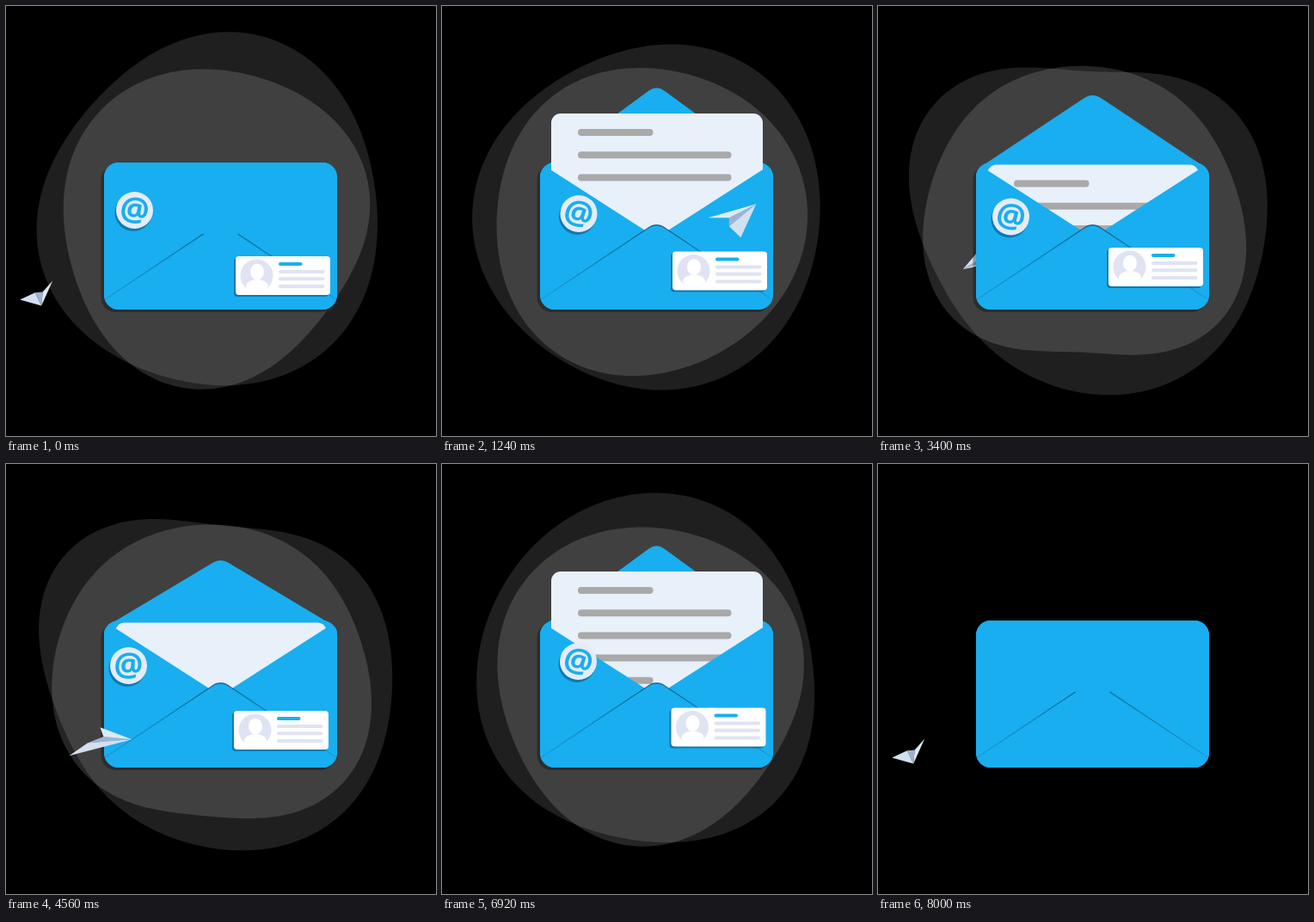
An HTML page with a canvas for the animation above (8040 ms loop, 500 by 500 pixels).

```html
<!DOCTYPE html>
<html>
<head>
<meta charset="utf-8">
<style>
html, body { margin: 0; height: 100%; overflow: hidden; background: #000; }
canvas { display: block; }
</style>
</head>
<body>
<canvas id="stage" width="500" height="500"></canvas>
<script>
const ctx = document.getElementById('stage').getContext('2d');
const LOOP = 8040, STEP = 40, CYCLE = 4000, TAU = 2 * Math.PI;
const BLUE = '#19aeef', PAPER = '#e8f0fa', PALE = '#dfe3f3';
const { sin, cos } = Math;

// time, badge x, y, card x, y
const drift = [
  [0, 149.5, 237.5, 267, 291],
  [1240, 159, 241.5, 268, 285.5],
  [3400, 154.5, 245, 268, 281],
  [4560, 142.5, 234.5, 265, 287],
  [5480, 144, 237.5, 271, 283.5],
  [6920, 158.5, 229.5, 266.5, 283.5]
];
// time, right and left wing tips seen from the nose
const pose = [
  [0, -25, -7, 13, -29],
  [560, -73, 19, -37, -14],
  [1240, -18, 39, -56, 16],
  [1480, 0, 24, -46, 20],
  [3400, 29, -34, 56, -12]
];

const clamp = v => Math.max(0, Math.min(1, v));
const ease = v => (v = clamp(v), v * v * (3 - 2 * v));

// Periodic cubic interpolation through the rows
function sample(rows, time, period) {
  const t = time % period, n = rows.length;
  const row = i => rows[(i + n) % n];
  const at = i => row(i)[0] + Math.floor(i / n) * period;
  let i = n - 1;
  while (at(i) > t) i--;
  const h = at(i + 1) - at(i), u = (t - at(i)) / h;
  return row(i).slice(1).map((_, k) => {
    const v = j => row(j)[k + 1];
    const slope = j => (v(j + 1) - v(j - 1)) / (at(j + 1) - at(j - 1)) * h;
    const a = v(i), d = v(i + 1) - a, m = slope(i), w = slope(i + 1);
    return a + u * (m + u * (3 * d - 2 * m - w + u * (m + w - 2 * d)));
  });
}

function fill(color, draw) {
  ctx.beginPath();
  draw(ctx);
  ctx.fillStyle = color;
  ctx.fill();
}
const box = (color, x, y, w, h, r) => fill(color, c => c.roundRect(x, y, w, h, r));
const oval = (color, x, y, rx, ry = rx) => fill(color, c => c.ellipse(x, y, rx, ry, 0, 0, 7));
const poly = (color, ...pts) => fill(color, c => {
  pts.forEach(p => c.lineTo(...p));
  c.closePath();
});

function clipToBody() {
  ctx.beginPath();
  ctx.roundRect(114, 182, 271, 171, 17);
  ctx.clip();
}

// Radii as sums of harmonics that swing with two slow waves w and v
const outer = (a, w, v) => 201
  + (4 + 4 * w) * cos(a) + (1 + 5 * w) * sin(a)
  + (2.5 + 6.5 * w) * cos(2 * a) + (4.5 + 8.5 * v) * sin(2 * a)
  + (3.5 * v - 3) * cos(3 * a) - (3 + 9 * w) * sin(3 * a)
  - (2.7 + 3.2 * v) * cos(4 * a);
const inner = (a, w, v) => 180.5
  + (4.3 - 3.5 * w) * sin(a)
  + (2.5 + 7 * w) * cos(2 * a) + (.5 + 3.5 * v) * sin(2 * a)
  + (1.5 - 3.5 * v) * cos(3 * a) + (1 + 8.5 * w) * sin(3 * a)
  - (1.5 + 3 * w) * cos(4 * a);

function blob(radius, time, alpha) {
  const w = cos(TAU * (time - 3500) / 8000), v = cos(TAU * (time - 4500) / 8000);
  fill(`rgba(255,255,255,${alpha})`, c => {
    for (let a = 0; a < TAU; a += TAU / 180) {
      const r = radius(a, w, v);
      c.lineTo(240 + r * cos(a), 245 + r * sin(a));
    }
  });
}

// The plane circles the envelope on a tilted orbit
function plane(t) {
  const phi = TAU * (t + 110) / CYCLE;
  const nose = [253 - 215 * cos(phi), 258 + 88 * cos(phi) + 21.5 * sin(phi)];
  const [rx, ry, lx, ly] = sample(pose, t, CYCLE);
  const point = (r, l) => [nose[0] + r * rx + l * lx, nose[1] + r * ry + l * ly];
  const fold = point(.2, .5), keel = point(.5, .4);
  poly('#9db4d0', nose, fold, keel);
  poly('#d3e0f1', nose, point(1, 0), keel);
  poly('#dcebf8', nose, point(0, 1), fold);
}

function flap(open) {
  ctx.save();
  if (open < 0) clipToBody();
  ctx.translate(0, 187);
  ctx.scale(1, open);
  fill(BLUE, c => {
    c.moveTo(114, 12);
    c.quadraticCurveTo(114, 4, 121, -1);
    c.lineTo(240.5, -88.5);
    c.quadraticCurveTo(249.5, -95, 258.5, -88.5);
    c.lineTo(378, -1);
    c.quadraticCurveTo(385, 4, 385, 12);
  });
  ctx.restore();
}

function letter(t) {
  const rise = ease((t - 640) / 240) - ease((t - 3120) / 240);
  const top = 184.5 - 59.5 * rise;
  box(PAPER, 127, top, 246, 340 - top, [11, 11, 0, 0]);
  for (let i = 0; i < 5; i++) {
    const full = i % 4 ? 178.5 : 87.5;
    const w = full * clamp((t - 880 - 120 * i) / 120);
    if (w > 0) box('#a9a9a9', 158, top + 18 + 26.2 * i, w, 8, 4);
  }
}

function pocket() {
  ctx.save();
  clipToBody();
  poly(BLUE, [114, 182.5], [249.5, 269.5], [385, 182.5], [385, 353], [114, 353]);
  const shade = ctx.createRadialGradient(249.5, 258, 0, 249.5, 258, 160);
  shade.addColorStop(0, 'rgba(10,70,105,.75)');
  shade.addColorStop(.35, 'rgba(10,70,105,.5)');
  shade.addColorStop(1, 'rgba(10,70,105,.15)');
  fill(BLUE, c => {
    c.moveTo(114, 342);
    c.lineTo(238.5, 259);
    c.quadraticCurveTo(249.5, 250.5, 260.5, 259);
    c.lineTo(385, 342);
  });
  ctx.strokeStyle = shade;
  ctx.lineWidth = 1.4;
  ctx.stroke();
  ctx.restore();
}

function badge(x, y) {
  oval('rgba(5,70,115,.5)', x - 1.5, y + 3, 21.5);
  oval('#e5ebf7', x, y, 21.5);
  ctx.save();
  ctx.translate(x, y);
  ctx.rotate((x - 142) * .015);
  ctx.font = 'bold 38px "Open Sans", sans-serif';
  ctx.textAlign = 'center';
  ctx.fillStyle = BLUE;
  const m = ctx.measureText('@');
  ctx.fillText('@', 0, (m.actualBoundingBoxAscent - m.actualBoundingBoxDescent) / 2);
  ctx.restore();
}

function card(x, y) {
  ctx.save();
  ctx.translate(x, y);
  box('rgba(5,70,115,.5)', -2, 2, 110, 45, 4);
  box('#fff', 0, 0, 110, 45, 4);
  oval(PALE, 24.5, 22.5, 19);
  ctx.save();
  ctx.clip();
  oval('#fff', 25, 18, 8, 9.5);
  oval('#fff', 25, 35, 13, 8);
  ctx.restore();
  box(BLUE, 50, 7, 27.5, 4, 2);
  [16, 24.3, 33].forEach(top => box(PALE, 50, top, 53.5, 4, 2));
  ctx.restore();
}

function draw(now) {
  const time = Math.floor(now % LOOP / STEP) * STEP;
  const t = time % CYCLE;
  const decorated = time < 8000;
  const open = 1.97 * (ease(t / 690) - ease((t - 3310) / 690)) - .97;
  const behind = t > 1900 && t < 3900;
  const [bx, by, cx, cy] = sample(drift, time, 8000);

  ctx.clearRect(0, 0, 500, 500);
  if (decorated) {
    blob(outer, time, .122);
    blob(inner, time, .147);
  }
  if (behind) plane(t);
  if (decorated) box('rgba(0,0,0,.32)', 110.5, 185, 272, 171, 17);
  if (open > 0) flap(open);
  box(BLUE, 114, 182, 271, 171, 17);
  letter(t);
  pocket();
  if (open <= 0) flap(open);
  if (decorated) {
    badge(bx, by);
    card(cx, cy);
  }
  if (!behind) plane(t);
}

const start = performance.now();
function tick() {
  draw(performance.now() - start);
  requestAnimationFrame(tick);
}
tick();
</script>
</body>
</html>
```
